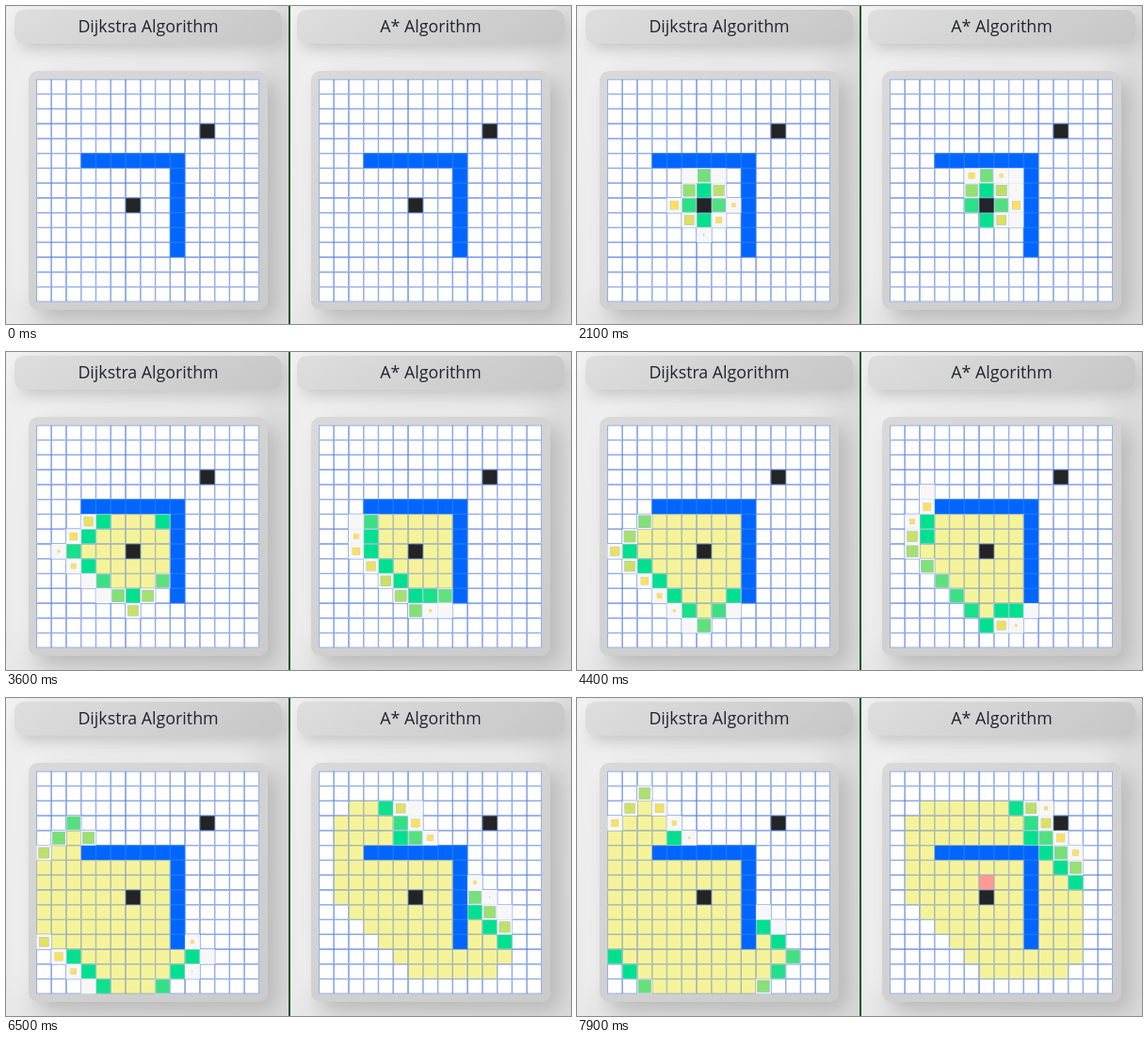
An HTML page with a canvas that plays this animation: 600 px wide and 338 px high, repeating every 8000 ms.

```html
<!DOCTYPE html>
<html lang="en">
<head>
<meta charset="utf-8">
<title>Dijkstra and A* side by side</title>
<style>
html, body { margin: 0; width: 100%; height: 100%; overflow: hidden; }
body { background: #e0e0e0; }
#stage { position: relative; width: 600px; height: 338px; overflow: hidden; }
.half { position: absolute; top: 0; width: 300px; height: 338px; overflow: hidden;
  background: linear-gradient(100deg, #eee, #e2e2e2 35%, #dadada); }
.half + .half { left: 300px; }
h1, .panel { position: absolute; margin: 0; border-radius: 10px; }
h1 { left: 9px; top: 4px; width: 284px; height: 36px; box-sizing: border-box;
  font: 500 17.8px/34px "Open Sans", "Noto Sans", sans-serif; color: #212529; text-align: center;
  background: linear-gradient(145deg, #dedede, #c6c6c6);
  box-shadow: 6px 6px 16px #c4c4c4, -6px -6px 16px #f4f4f4; }
.panel { left: 24px; top: 69px; width: 254px; height: 254px;
  background: linear-gradient(145deg, #d9d9d9, #cacaca);
  box-shadow: 10px 10px 22px #b8b8b8, -10px -10px 22px #f3f3f3; }
.divider { position: absolute; left: 300px; top: 0; width: 2px; height: 338px; background: #0f5a1c; }
canvas { position: absolute; left: 0; top: 0; }
</style>
</head>
<body>
<div id="stage">
  <div class="half"><h1>Dijkstra Algorithm</h1><div class="panel"></div></div>
  <div class="half"><h1>A* Algorithm</h1><div class="panel"></div></div>
  <div class="divider"></div>
  <canvas width="600" height="338"></canvas>
</div>
<script>
const ctx = document.querySelector("canvas").getContext("2d");
const N = 15, CELL = 15.77, LOOP = 8000, VISIT = 17;
const start = { x: 6, y: 8 }, goal = { x: 11, y: 3 };
const moves = [[0, -1], [0, 1], [-1, 0], [1, 0]];
const same = (a, b) => a.x === b.x && a.y === b.y;
const id = c => c.y * N + c.x;
const isWall = (x, y) => (y === 5 && x >= 3 && x <= 9) || (x === 9 && y >= 5 && y <= 11);

// Cells in the order in which the search discovers them.
function search(cost) {
  const open = [{ ...start, d: 0 }], seen = new Set([id(start)]), order = [];
  while (open.length) {
    let best = 0;
    open.forEach((c, i) => { if (cost(c) < cost(open[best])) best = i; });
    const cur = open.splice(best, 1)[0];
    for (const [dx, dy] of moves) {
      const c = { x: cur.x + dx, y: cur.y + dy, d: cur.d + 1 };
      if (c.x < 0 || c.y < 0 || c.x >= N || c.y >= N || isWall(c.x, c.y) || seen.has(id(c))) continue;
      if (same(c, goal)) return order;
      seen.add(id(c));
      open.push(c);
      order.push(c);
    }
  }
  return order;
}

// Piecewise linear interpolation through [x, y] points.
function lerp(points, x) {
  if (x <= points[0][0]) return points[0][1];
  for (let i = 1; i < points.length; i++) {
    const [x0, y0] = points[i - 1], [x1, y1] = points[i];
    if (x <= x1) return y0 + (y1 - y0) * (x - x0) / (x1 - x0);
  }
  return points[points.length - 1][1];
}

const pace = end => [[1240, 0], [2700, 24.2], [4400, 51.8], [5300, 68.5], [6500, 87.1], [7900, end]];
const growth = [[1.8, 0], [3, .22], [4, .38], [5, .54], [6, .64], [7, .73], [8, .8], [9, .86], [10, .92], [12, 1]];
const boards = [
  { left: 32.4, order: search(c => c.d + id(c) / 1000), pace: pace(109.6) },
  { left: 332.4, order: search(c => c.d + Math.abs(c.x - goal.x) + Math.abs(c.y - goal.y)),
    pace: pace(111.2), pathAt: 7850 }
];

function drawCell(left, { x, y }, fill, border = "#5b84d8", scale = 1) {
  const size = CELL * scale, w = .65 * scale;
  const px = left + (x + .5) * CELL - size / 2, py = 77.8 + (y + .5) * CELL - size / 2;
  ctx.fillStyle = fill;
  ctx.fillRect(px, py, size, size);
  if (!border) return;
  ctx.strokeStyle = border;
  ctx.lineWidth = w;
  ctx.strokeRect(px + w / 2, py + w / 2, size - w, size - w);
}

function visitColor(age) {
  const k = lerp([[5.3, 0], [12.5, 1]], age);
  return `rgb(${255 - 255 * k}, 224, ${92 + 52 * k})`;
}

function drawBoard({ left, order, pace, pathAt }, t) {
  for (let y = 0; y < N; y++)
    for (let x = 0; x < N; x++)
      isWall(x, y) ? drawCell(left, { x, y }, "#0066ff", "#2478fa") : drawCell(left, { x, y }, "#fff");

  const now = lerp(pace, t);
  order.forEach((c, i) => {
    const age = now - i - 1;
    if (age < 0) return;
    if (age >= VISIT) return drawCell(left, c, "#f5f39a", "#8ba3bd");
    drawCell(left, c, "#f7f7f8", null);
    const scale = lerp(growth, age);
    if (scale > 0) drawCell(left, c, visitColor(age), "#a9bfd8", scale);
  });

  if (t >= pathAt) drawCell(left, { x: 6, y: 7 }, "#ff9a92", "#b9a3b5");
  for (const c of [start, goal]) drawCell(left, c, "#222426", "#5a6f9c");
}

function frame(ms) {
  const t = Math.floor(ms % LOOP / 100) * 100;
  ctx.clearRect(0, 0, 600, 338);
  boards.forEach(b => drawBoard(b, t));
  requestAnimationFrame(frame);
}
requestAnimationFrame(frame);
</script>
</body>
</html>
```
